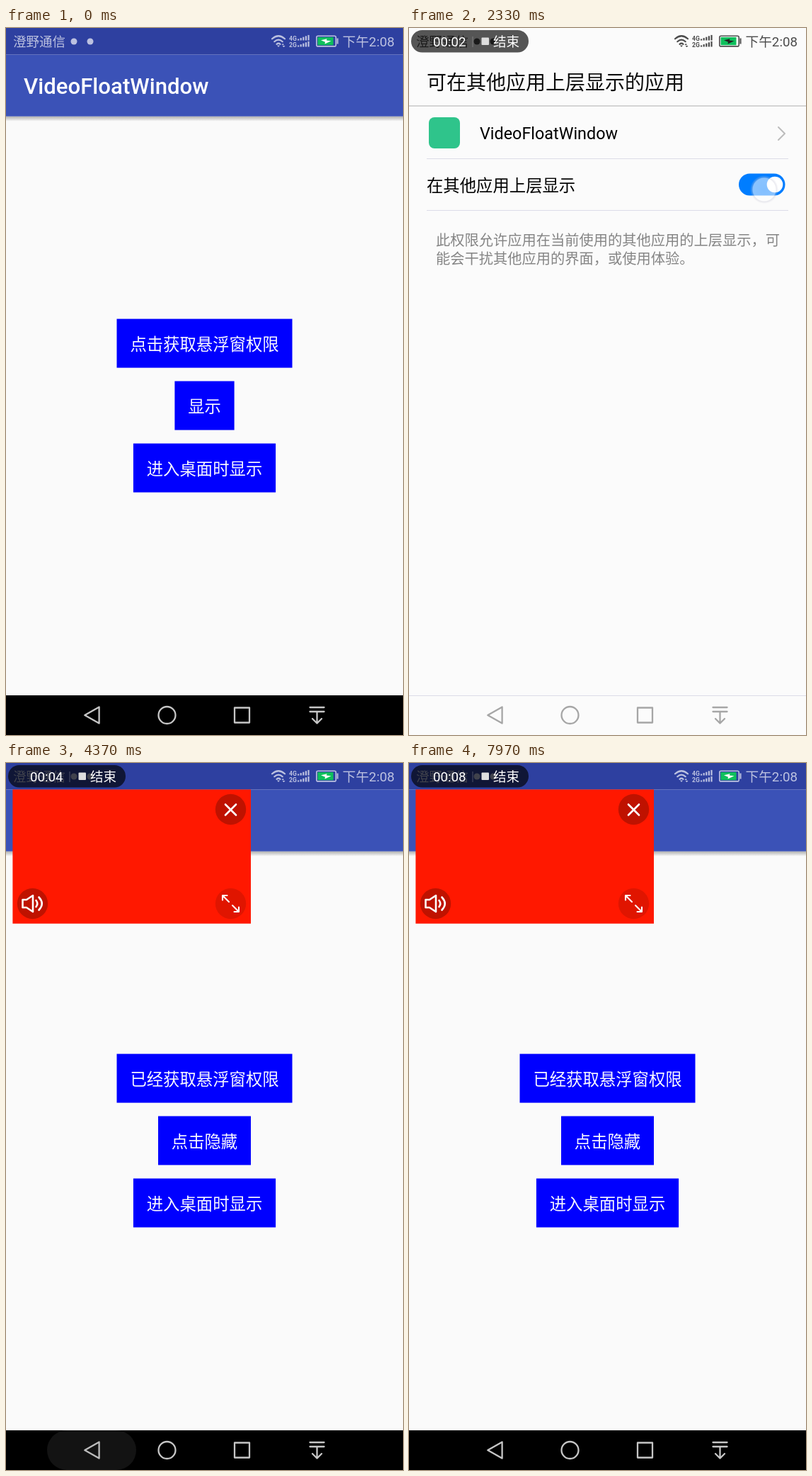
Write an HTML page that moves like this. It is 561 px wide and 998 px high and loops after 8000 ms.

```html
<!DOCTYPE html>
<html lang="zh-CN">
<head>
<meta charset="utf-8">
<title>VideoFloatWindow</title>
<style>
html, body { margin: 0; width: 100%; height: 100%; overflow: hidden; background: #000; }
svg { display: block; width: 561px; height: 998px; }
text { font-family: Roboto, "Noto Sans CJK SC", "Noto Sans CJK", sans-serif; font-size: 23.37px; white-space: pre; }
.line { fill: none; stroke-linecap: round; stroke-linejoin: round; }
</style>
</head>
<body>
<svg viewBox="0 0 561 998" xmlns="http://www.w3.org/2000/svg">
  <defs>
    <linearGradient id="shade" x1="0" y1="0" x2="0" y2="1">
      <stop offset="0" stop-color="#000" stop-opacity=".3"/>
      <stop offset="1" stop-color="#000" stop-opacity="0"/>
    </linearGradient>
    <radialGradient id="glow">
      <stop offset="0" stop-color="#fff" stop-opacity=".95"/>
      <stop offset=".8" stop-color="#fff"/>
      <stop offset=".86" stop-color="#c4c4d4" stop-opacity=".65"/>
      <stop offset="1" stop-color="#c4c4d4" stop-opacity="0"/>
    </radialGradient>
    <clipPath id="edge"><rect id="edgeBox" y="940" width="561" height="58"/></clipPath>
    <g id="navIcons" class="line" stroke-width="2.3">
      <path d="M111.3 970L131.6 958.4V981.6Z"/>
      <circle cx="227.5" cy="970" r="12"/>
      <rect x="323" y="959.5" width="21" height="21"/>
      <path d="M429.5 959H449.5M429.5 965H449.5M439.5 965V981M433 975L439.5 981.5L446 975"/>
    </g>
  </defs>

  <g id="main">
    <rect width="561" height="942" fill="#fafafa"/>
    <rect y="124.7" width="561" height="7" fill="url(#shade)"/>
    <rect y="37.4" width="561" height="87.3" fill="#3b52b7"/>
    <rect width="561" height="37.4" fill="#2e40a0"/>
    <text x="25" y="93" fill="#fff" style="font-size:31.17px;font-weight:500">VideoFloatWindow</text>
    <g id="buttons" text-anchor="middle"></g>
  </g>
  <rect id="dim" width="561" height="942"/>
  <rect y="942" width="561" height="56"/>
  <use href="#navIcons" stroke="#c6c6c6"/>

  <g id="settings">
    <rect width="561" height="998" fill="#fbfbfb"/>
    <text x="25" y="86.8" fill="#0c0c0c" style="font-size:28px">可在其他应用上层显示的应用</text>
    <rect y="109" width="561" height="2" fill="#d4d4d4"/>
    <rect x="28" y="126" width="44" height="44" rx="8" fill="#2fc48b"/>
    <text x="100" y="157">VideoFloatWindow</text>
    <path class="line" d="M522 140L531 149L522 158" stroke="#bcbcbc" stroke-width="2"/>
    <path d="M25 184.5H536M25 257.5H536M0 942.5H561" stroke="#dcdce8" stroke-width="1.2"/>
    <text x="25" y="230.8">在其他应用上层显示</text>
    <rect id="track" x="466" y="205.5" width="65.5" height="31" rx="15.5"/>
    <circle id="thumb" cy="221" r="11.3" fill="#fff"/>
    <g fill="#858585">
      <text x="38" y="306.7" style="font-size:20.26px">此权限允许应用在当前使用的其他应用的上层显示，可</text>
      <text x="38" y="332.7" style="font-size:20.26px">能会干扰其他应用的界面，或使用体验。</text>
    </g>
  </g>
  <use href="#navIcons" stroke="#a6a6a6" clip-path="url(#edge)"/>
  <rect id="ripple" y="942" height="56" rx="28" fill="#808080"/>

  <g id="status">
    <text x="10" y="26" style="font-size:18.5px">澄野通信</text>
    <circle cx="96" cy="19" r="4.5"/>
    <circle cx="119" cy="19" r="4.5"/>
    <path class="line" stroke="currentColor" stroke-width="2.2" d="M376 15.3Q385 7.2 394 15.3M379.3 19.2Q385 14 390.7 19.2M382.5 22.8Q385 20.6 387.5 22.8"/>
    <path d="M383 24.5H387L385 27ZM389.5 24L391.2 21.8L393 24ZM390.5 25H394.5L392.5 27.3Z"/>
    <text x="400" y="18" style="font-size:8.6px;font-weight:700">4G</text>
    <text x="400" y="27" style="font-size:8.6px;font-weight:700">2G</text>
    <g id="bars"></g>
    <rect x="438.8" y="11.3" width="27.4" height="14.6" rx="2" fill="none" stroke="currentColor" stroke-width="1.6"/>
    <rect x="467.5" y="14.5" width="2" height="8"/>
    <text x="475.5" y="26" style="font-size:18.7px">下午2:08</text>
  </g>
  <rect x="440.5" y="13" width="22" height="11.2" fill="#0fbf5c"/>
  <path id="bolt" d="M445 17.2L453.5 15.2L452.8 17.6L459.5 18.3L450.5 22.4L451 19.8Z"/>

  <g id="float">
    <rect x="9.4" y="37.4" width="336.6" height="189.3" fill="#ff1800"/>
    <circle cx="317.5" cy="65.5" r="21.7" fill-opacity=".25"/>
    <circle cx="37.5" cy="198.5" r="21.7" fill-opacity=".25"/>
    <circle cx="317.5" cy="198.5" r="21.7" fill-opacity=".12"/>
    <g class="line" stroke="#fff" stroke-width="2.6">
      <path d="M310 58.5L325 73.5M325 58.5L310 73.5"/>
      <path d="M23.5 193H29L38 187V210L29 204H23.5Z"/>
      <path d="M42.5 194Q46 198.5 42.5 203M46.5 189.5Q55 198.5 46.5 207.5"/>
      <path stroke-width="2.1" d="M315 196L306 187M306 193.5V187H312.5M320 201L329 210M329 203.5V210H322.5"/>
    </g>
  </g>

  <g id="pill">
    <rect x="3" y="3" width="166" height="31.5" rx="15.7" fill-opacity=".66"/>
    <circle id="dot" cx="22" cy="19" r="6.5" fill="#ff4a1c"/>
    <text id="clock" x="34" y="26" fill="#fff" style="font-size:18.7px"></text>
    <path d="M90 12V27" stroke="#fff" stroke-opacity=".25"/>
    <rect x="102.5" y="13.5" width="10.5" height="10.5" rx="1" fill="#dedede"/>
    <text x="119" y="26" fill="#fff" style="font-size:18.5px">结束</text>
  </g>
  <circle id="touch" r="20" fill="url(#glow)"/>
</svg>
<script>
const LOOP = 8000, W = 561;
const OPEN = [1394, 1669], CLOSE = [4063, 4300];
const HIDE = 5645, SHOW = 7020;
const TICKS = [970, 1970, 2970, 4230, 4970, 6000, 7000, 7970];
// x, y, press, release
const TAPS = [[300, 448, 700, 830], [502, 228, 2170, 2240], [141, 974, 3530, 3880],
  [304, 542, 5520, 5640], [304, 542, 6900, 7010]];

const NS = 'http://www.w3.org/2000/svg';
const $ = id => document.getElementById(id);
const span = (t, a, b) => Math.min(1, Math.max(0, (t - a) / (b - a)));
const easeOut = p => 1 - (1 - p) ** 2;

function set(node, attrs) {
  for (const k in attrs) node.setAttribute(k, attrs[k]);
  return node;
}
const add = (parent, tag, attrs) => parent.appendChild(set(document.createElementNS(NS, tag), attrs));

function label(node, text) {
  if (node.textContent !== text) node.textContent = text;
}

const buttons = [410.6, 498.5, 586.5].map(y => ({
  box: add($('buttons'), 'rect', { y, height: 69, fill: '#00f' }),
  text: add($('buttons'), 'text', { x: 280.5, y: y + 44.8, fill: '#f8f8ff' })
}));

function setButton(i, text) {
  const w = text.length * 23.4 + 37.4;
  set(buttons[i].box, { x: 280.5 - w / 2, width: w });
  label(buttons[i].text, text);
}

for (const base of [17.5, 26.5])
  for (let i = 0; i < 5; i++) {
    const h = 2 + i * 1.4;
    add($('bars'), 'rect', { x: 412 + i * 3.6, y: base - h, width: 2.2, height: h });
  }

function drawWindows(t) {
  const open = easeOut(span(t, ...OPEN)), close = easeOut(span(t, ...CLOSE));
  const x = W * (1 - open + close);
  const cover = t < CLOSE[0] ? open ** 2.75 : 1 - close ** 2.2;
  const dark = t >= OPEN[0] && t < CLOSE[0];
  set($('main'), { transform: `translate(${-168 * cover} 0)` });
  set($('dim'), { opacity: cover });
  set($('settings'), { transform: `translate(${x} 0)` });
  set($('edgeBox'), { x });
  set($('status'), { fill: dark ? '#4c4c4c' : '#fff', color: dark ? '#4c4c4c' : '#fff', opacity: dark ? 1 : .68 });
  set($('bolt'), { fill: dark ? '#222' : '#fff' });
}

function drawControls(t) {
  const granted = t >= CLOSE[0];
  const shown = granted && (t < HIDE || t >= SHOW);
  setButton(0, granted ? '已经获取悬浮窗权限' : '点击获取悬浮窗权限');
  setButton(1, !granted ? '显示' : shown ? '点击隐藏' : '点击显示');
  setButton(2, '进入桌面时显示');
  const from = t < HIDE ? CLOSE[0] : SHOW;
  set($('float'), { opacity: shown ? span(t, from, from + 80) : 0 });

  const on = easeOut(span(t, 2210, 2330));
  set($('thumb'), { cx: 480.5 + 36.5 * on });
  set($('track'), { fill: `rgb(${212 * (1 - on)},${212 - 87 * on},${212 + 43 * on})` });
}

function drawTouch(t) {
  const tap = TAPS.find(p => t >= p[2] && t < p[3] + 400);
  if (tap) set($('touch'), { cx: tap[0], cy: tap[1] });
  set($('touch'), { opacity: tap ? .7 * span(t, tap[2] - 30, tap[2] + 40) * (1 - span(t, tap[3], tap[3] + 400)) : 0 });

  const w = 56 + 70 * easeOut(span(t, 3530, 3700));
  set($('ripple'), { x: 121 - w / 2, width: w, opacity: .22 * span(t, 3520, 3620) * (1 - span(t, 4310, 4500)) });
}

function drawPill(t) {
  const sec = TICKS.filter(s => t >= s).length;
  set($('pill'), { opacity: span(t, 30, 230) });
  set($('dot'), { opacity: t >= sec * 1000 + 500 ? 1 : 0 });
  label($('clock'), '00:0' + sec);
}

function draw(t) {
  drawWindows(t);
  drawControls(t);
  drawTouch(t);
  drawPill(t);
}

let start;
function frame(now) {
  start ??= now;
  draw((now - start) % LOOP);
  requestAnimationFrame(frame);
}
draw(0);
requestAnimationFrame(frame);
</script>
</body>
</html>
```
